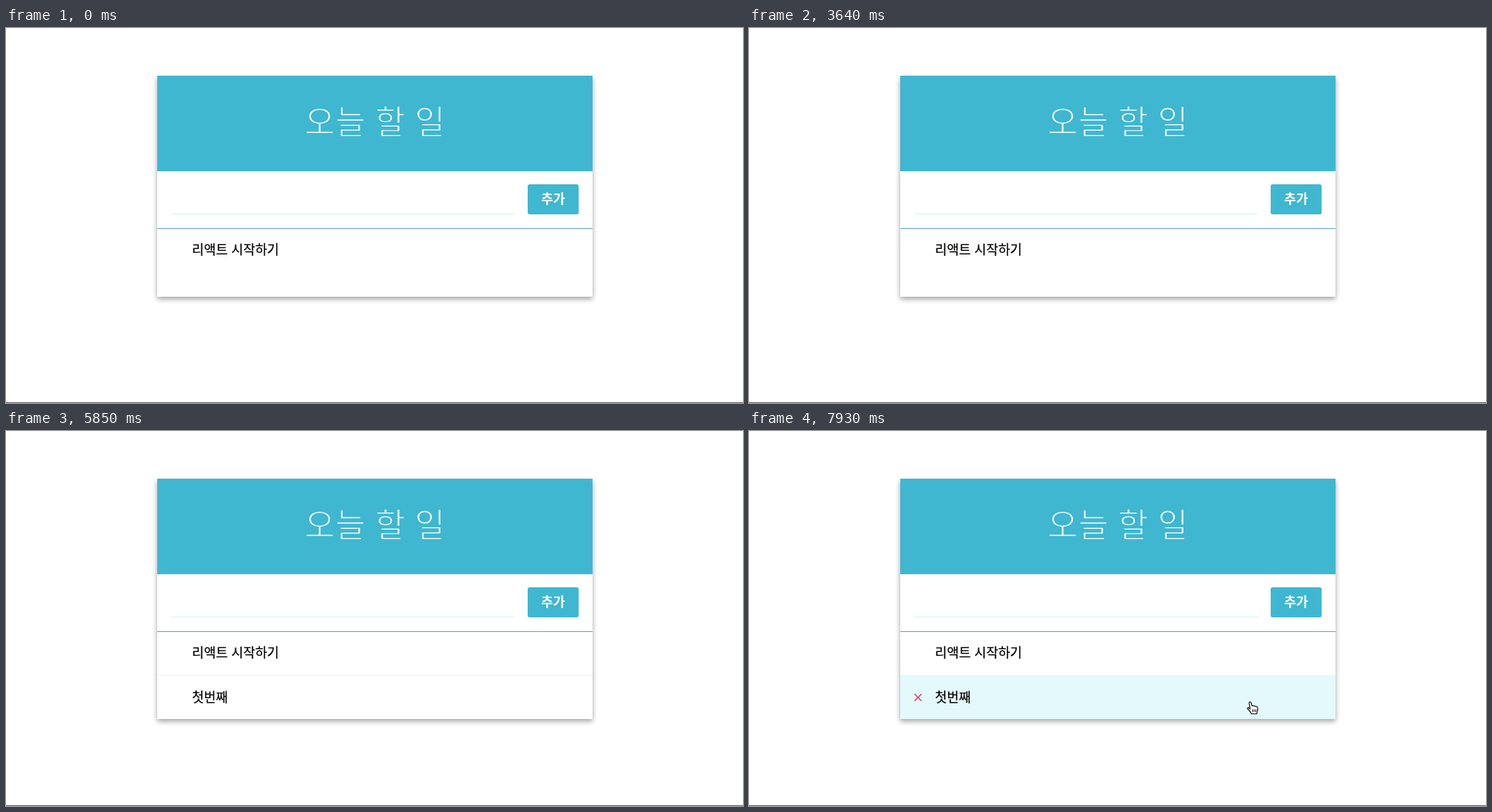
Recreate the animation shown at these times as an HTML page. Size 955 by 487 pixels, loop 8 s.

```html
<!DOCTYPE html>
<html lang="ko">
<head>
<meta charset="utf-8">
<title>오늘 할 일</title>
<style>
  html, body { margin: 0; width: 100%; height: 100%; overflow: hidden; background: #fff; }
  #card {
    position: absolute; left: 196px; top: 62px; width: 564px; background: #fff;
    box-shadow: 0 3.3px 6.6px rgba(0,0,0,.16), 0 3.3px 6.6px rgba(0,0,0,.23);
  }
  svg { position: absolute; left: 0; top: 0; }
  text { font-family: "Noto Sans CJK KR", "Noto Sans CJK JP", "Noto Sans CJK", sans-serif; }
  /* A stroke in the header colour trims the glyphs to a hairline weight. */
  .title { font-size: 43px; fill: #fff; stroke: #3fb7d0; stroke-width: 1.5; text-anchor: middle; }
  .button { font-size: 16.8px; font-weight: 700; fill: #fff; text-anchor: middle; }
  .item { font-size: 16.8px; stroke: #000; stroke-width: .2; }
  #value { font-size: 21px; }
  .brand { fill: #3fb7d0; }
</style>
</head>
<body>
<div id="card"></div>
<svg width="955" height="487" viewBox="0 0 955 487">
  <rect class="brand" x="196" y="62" width="564" height="124"/>
  <text class="title" x="478" y="137.5">오늘 할 일</text>
  <rect x="214" y="241" width="445" height="1" fill="#d5f3f3"/>
  <rect class="brand" x="676" y="203" width="66" height="39" rx="2.5"/>
  <text class="button" x="709" y="228">추가</text>
  <rect x="196" y="260" width="564" height="1" fill="#64abbd"/>
  <text class="item" x="241" y="293.5">리액트 시작하기</text>

  <text id="value" x="214.5" y="228"></text>
  <rect id="composing" y="232" width="18" height="1.5"/>
  <rect id="caret" width="1"/>

  <g id="added">
    <rect id="hover" x="196" y="317" width="564" height="57" fill="#e3f9fc"/>
    <rect id="divider" x="196" y="317" width="564" height="1" fill="#f1f3f5"/>
    <path id="remove" d="M214.5 341.5l9 9m0-9l-9 9" stroke="#dc4e75" stroke-width="1.7"/>
    <text class="item" x="241" y="351.5">첫번째</text>
  </g>

  <g id="pointer">
    <path id="arrow" d="M.5.5V14L3.6 11 5.8 16 8 15 5.9 10.3H10Z" stroke="#fff" stroke-width=".8"/>
    <g id="hand" fill="#fff" stroke="#000" stroke-width="1.1" stroke-linejoin="round">
      <path d="M3 2Q3 .7 4.2 .7 5.2 .7 5.6 2L6.9 6Q8 5.2 9.2 6.2 10.5 5.6 11.6 6.8 13.6 6.3 14 8.2 14.6 10.5 13.4 13L12.9 16.3H6Q5 13.8 1 9.6 .8 8 2.4 8.4L4.4 10Z"/>
      <path d="M7.3 10.5l.4 3.3m1.7-3.3l.3 3.3m1.7-3.3l.2 3.3" stroke-width=".9"/>
    </g>
  </g>
  <rect y="486" width="955" height="1" fill="#666"/>
</svg>
<script>
const LOOP = 8000, TICK = 130, SYLLABLE = 19.2;
const ADDED_AT = 5330, POINTER_AT = 6760, ENTER_AT = 6890, HOVER_AT = 7020;

const typing = [
  [0, ''], [3900, 'ㅊ'], [4030, '처'], [4160, '첫'], [4290, '첫ㅂ'], [4420, '첫버'],
  [4550, '첫번'], [4810, '첫번ㅉ'], [4940, '첫번째'], [ADDED_AT, '']
];
const caretOn = [
  [1430, 1820], [2340, 2860], [3250, 3640], [3900, 5850], [6370, 6890], [7410, 7930]
];
const pointerPath = [
  [6760, 652, 410], [6890, 591, 353], [7020, 547, 346], [7150, 537, 345],
  [7280, 538, 345], [7670, 610, 349], [7930, 645, 351]
];

const $ = id => document.getElementById(id);
const show = (id, on) => $(id).style.display = on ? '' : 'none';
const place = (id, attrs) => {
  for (const name in attrs) $(id).setAttribute(name, attrs[name]);
};

function pointAt(t) {
  const next = pointerPath.findIndex(p => p[0] > t);
  if (next < 0) return pointerPath.at(-1).slice(1);
  if (next === 0) return pointerPath[0].slice(1);
  const [t0, x0, y0] = pointerPath[next - 1], [t1, x1, y1] = pointerPath[next];
  const k = (t - t0) / (t1 - t0);
  return [x0 + (x1 - x0) * k, y0 + (y1 - y0) * k];
}

function draw(time) {
  const t = Math.floor(time / TICK) * TICK;

  const text = typing.findLast(step => step[0] <= t)[1];
  const count = text.length;
  $('value').textContent = text;
  show('composing', count);
  place('composing', { x: 215 + (count - 1) * SYLLABLE + .4 });
  show('caret', caretOn.some(([from, to]) => t >= from && t < to));
  place('caret', {
    x: Math.floor(215 + count * SYLLABLE), y: count ? 208 : 209, height: 26
  });

  $('card').style.height = (t >= ADDED_AT ? 312 : 287) + 'px';
  show('added', t >= ADDED_AT);
  show('remove', t >= ENTER_AT);
  show('hover', t >= HOVER_AT);
  show('divider', t < HOVER_AT);

  show('pointer', t >= POINTER_AT);
  show('arrow', t < ENTER_AT);
  show('hand', t >= ENTER_AT);
  const [x, y] = pointAt(t).map(Math.round);
  place('pointer', { transform: `translate(${x} ${y})` });
}

const start = performance.now();
function frame() {
  draw((performance.now() - start) % LOOP);
  requestAnimationFrame(frame);
}
frame();
</script>
</body>
</html>
```
